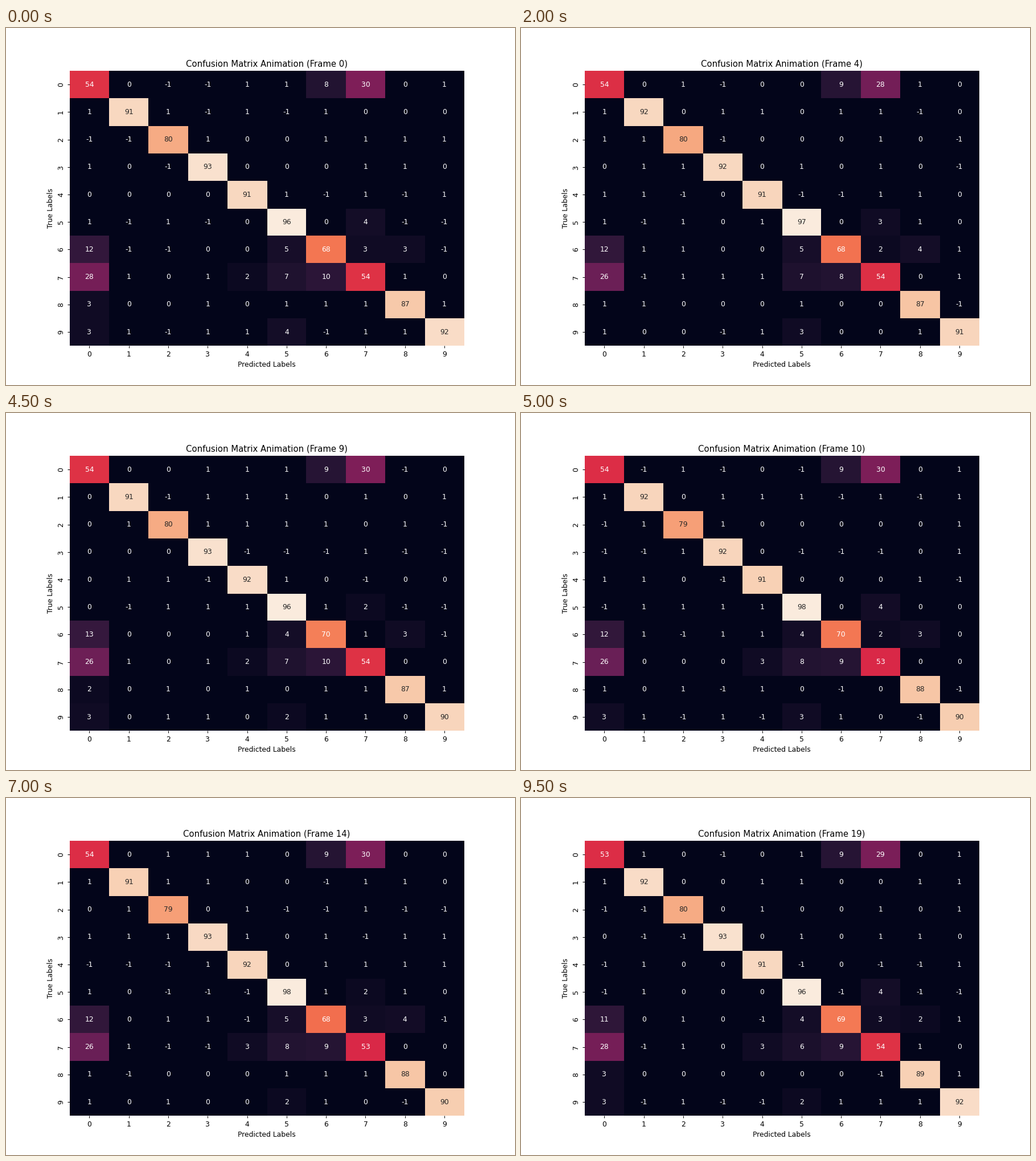
Write a matplotlib script that moves like this. It is 894 px wide and 626 px high and loops after 10000 ms.

```python
import numpy as np
import matplotlib.pyplot as plt
from matplotlib.animation import FuncAnimation
from matplotlib.colors import LinearSegmentedColormap

WIDTH, HEIGHT, DPI = 894, 626, 89.4
N, STEPS, STEP_MS = 10, 20, 500
LOWEST = -1

plt.rcParams["font.family"] = "DejaVu Sans"

ROCKET = LinearSegmentedColormap.from_list("rocket_like", [
    "#03051A", "#221331", "#451C47", "#6A1F56", "#921C5B", "#B91657",
    "#D92847", "#ED513E", "#F47C56", "#F6A47B", "#F7C9AA", "#FAEBDD"])

# Correct predictions, then the (true, predicted) pairs often mixed up.
base = np.diag([53, 92, 79, 92, 91, 97, 69, 53, 88, 91])
CONFUSIONS = {(0, 6): 8, (0, 7): 29, (5, 7): 3, (6, 0): 12, (6, 5): 4,
              (6, 8): 3, (7, 0): 27, (7, 5): 7, (7, 6): 9, (9, 5): 3}
for pair, count in CONFUSIONS.items():
    base[pair] = count
base[8:, 0] = base[6, 7] = base[7, 4] = 2


def matrix_at(step):
    rng = np.random.default_rng(step)
    return base + rng.choice([-1, 0, 1], size=base.shape, p=[0.26, 0.36, 0.38])


def cell_edges(cell_size):
    """Cell borders in data units, rounded to whole pixels of a 100 dpi page."""
    return np.floor(np.arange(N + 1) * cell_size + 0.5) / cell_size


fig, ax = plt.subplots(figsize=(WIDTH / DPI, HEIGHT / DPI), dpi=DPI)
fig.subplots_adjust(left=0.125, right=0.9, bottom=0.11, top=0.88)

mesh = ax.pcolormesh(cell_edges(77.5), cell_edges(53.9), np.zeros((N, N)),
                     cmap=ROCKET)
ax.set(xlim=(0, N), ylim=(N, 0),
       xlabel="Predicted Labels", ylabel="True Labels")
centers = np.arange(N) + 0.5
ax.set_xticks(centers, range(N))
ax.set_yticks(centers, range(N), rotation="vertical", va="center")
ax.spines[:].set_visible(False)
title = ax.set_title("")
labels = [[ax.text(x, y, "", ha="center", va="center") for x in centers]
          for y in centers]


def draw(step):
    matrix = matrix_at(step)
    # Near-empty cells share the darkest tone.
    mesh.set_array(np.where(matrix < 2, LOWEST, matrix))
    mesh.set_clim(LOWEST, matrix.max())
    for label_row, value_row in zip(labels, matrix):
        for label, value in zip(label_row, value_row):
            label.set_text(str(value))
            label.set_color("0.15" if value > 73 else "white")
    title.set_text(f"Confusion Matrix Animation (Frame {step})")
    return [mesh, title]


animation = FuncAnimation(fig, draw, frames=STEPS, interval=STEP_MS,
                          repeat=True, repeat_delay=0)
plt.show()
```
